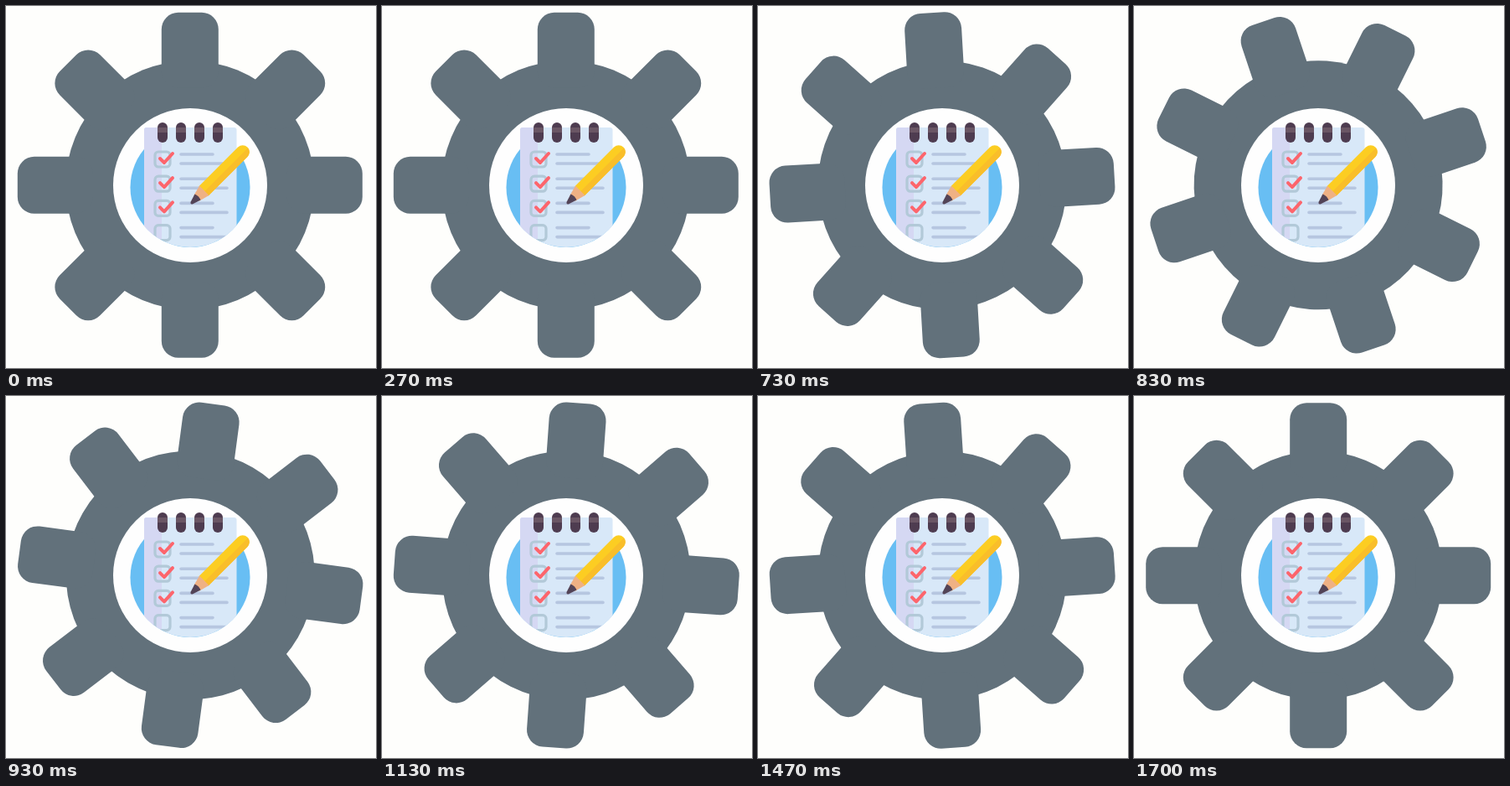
Recreate the animation shown at these times as an HTML page. Size 442x432 px, loop 1730 ms.

```html
<!DOCTYPE html>
<html lang="en">
<head>
<meta charset="utf-8">
<title>Gear and checklist</title>
<style>
  html, body { margin: 0; width: 100%; height: 100%; overflow: hidden; background: #fefefc; }
  svg { display: block; width: 100vw; height: 100vh; }
</style>
</head>
<body>
<svg viewBox="0 0 442 432" preserveAspectRatio="xMidYMid meet">
  <defs>
    <clipPath id="padClip">
      <path d="M148 130H292V216A72 72 0 0 1 148 216Z"/>
    </clipPath>
  </defs>

  <g id="gear" fill="#62717b">
    <circle cx="-.2" cy="-.2" r="148.5"/>
    <g id="teeth" transform="translate(-.2 -.2)"/>
  </g>
  <circle cx="220" cy="214" r="92" fill="#fefefe"/>

  <circle cx="220" cy="216.5" r="71.5" fill="#68bef3"/>
  <g clip-path="url(#padClip)">
    <rect x="165" y="145" width="110.5" height="151" rx="3" fill="#d8e8f8"/>
    <path d="M168 145H186V296H165V148Q165 145 168 145Z" fill="#d5d8f3"/>
    <g id="rows" fill="none" stroke-linecap="round" stroke-linejoin="round"/>
  </g>
  <g id="rings"/>

  <g transform="translate(220.5 236.5) rotate(-45)">
    <path d="M22 -8H88A8 8 0 0 1 88 8H22Z" fill="#fccd22"/>
    <path d="M22 1H96A8 8 0 0 1 88 8H22Z" fill="#f9be2a"/>
    <path d="M23 -8L10 -4.6V4.6L23 8Z" fill="#efb184"/>
    <path d="M12 -5L2 -1.8Q-1 0 2 1.8L12 5Q14 0 12 -5Z" fill="#534457"/>
  </g>
</svg>
<script>
  const NS = "http://www.w3.org/2000/svg";
  const byId = id => document.getElementById(id);

  function add(parent, tag, attrs) {
    const node = document.createElementNS(NS, tag);
    for (const key in attrs) node.setAttribute(key, attrs[key]);
    parent.appendChild(node);
  }

  for (let i = 0; i < 8; i++) {
    add(byId("teeth"), "rect", {
      x: -34, y: -206, width: 68, height: 90, rx: 20, transform: `rotate(${i * 45})`
    });
  }

  for (let i = 0; i < 4; i++) {
    const x = 181 + i * 22;
    add(byId("rings"), "rect", { x, y: 139, width: 12, height: 24, rx: 6, fill: "#4e3c50" });
    add(byId("rings"), "rect", { x, y: 145, width: 12, height: 6, fill: "#6a5664" });
  }

  for (let i = 0; i < 4; i++) {
    const y = 183 + i * 29.2;
    const rows = byId("rows");
    add(rows, "rect", {
      x: 178, y: y - 9, width: 18, height: 18, rx: 4, stroke: "#b2c9d8", "stroke-width": 3.2
    });
    add(rows, "path", {
      d: `M209 ${y - 6}H247M209 ${y + 5}H264`, stroke: "#b6c6e0", "stroke-width": 3.6
    });
    if (i < 3) {
      add(rows, "path", {
        d: `M184 ${y - 1}l5 5L199 ${y - 7}`, stroke: "#fd656c", "stroke-width": 4
      });
    }
  }

  const LOOP = 1730, FRAME = 100 / 3;
  const TURN_START = 610, TURN_TIME = 1000;

  // The gear rests, then makes a half turn that slows to a stop.
  function draw(time) {
    const stepped = Math.floor((time % LOOP + 4) / FRAME) * FRAME;
    const progress = Math.min(1, Math.max(0, (stepped - TURN_START) / TURN_TIME));
    const angle = 180 * (1 - (1 - progress) ** 2);
    byId("gear").setAttribute("transform", `translate(220 214) rotate(${angle})`);
  }

  const start = performance.now();
  function tick() {
    draw(performance.now() - start);
    requestAnimationFrame(tick);
  }
  tick();
</script>
</body>
</html>
```
